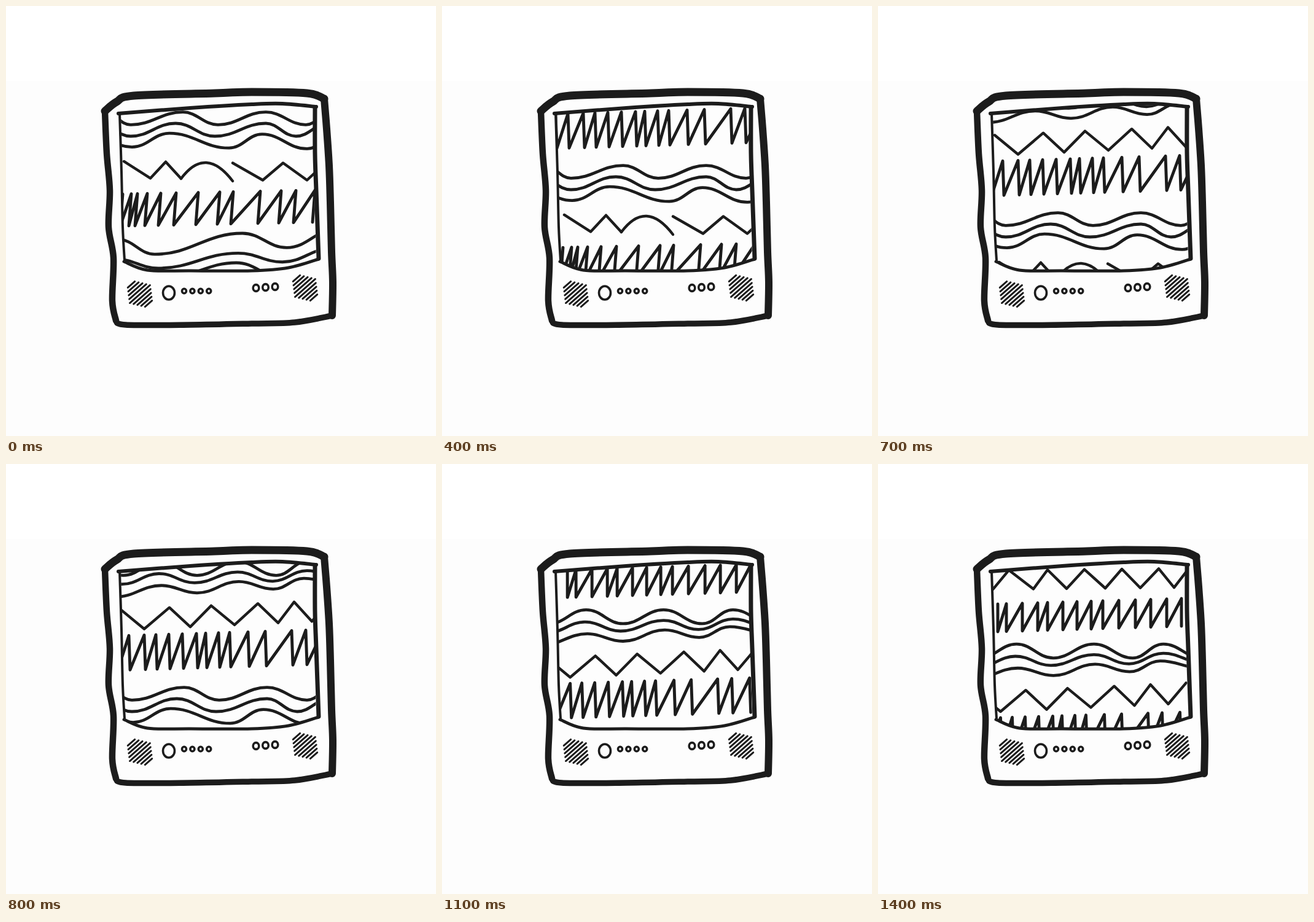
These frames come from a looping animation (700 px wide and 700 px high, 1.5 s). An HTML page:

```html
<!DOCTYPE html>
<html lang="en">
<head>
<meta charset="utf-8">
<title>Television</title>
<style>
  html, body { margin: 0; width: 100%; height: 100%; overflow: hidden; background: #fff; }
  svg { display: block; width: 100vw; height: 100vh; }
  .ink { fill: none; stroke: #1c1c1c; stroke-linecap: round; stroke-linejoin: round; }
</style>
</head>
<body>
<svg viewBox="0 0 700 700">
  <defs>
    <clipPath id="screen">
      <path d="M187 176L300 166L400 160L501 164L502 300L505 412L460 427L400 431L230 430L193 416L189 300Z"/>
    </clipPath>
  </defs>
  <rect width="700" height="700" fill="#fff"/>
  <rect y="122" width="700" height="578" fill="#fdfdfd"/>
  <g clip-path="url(#screen)"><g id="strip" class="ink"></g></g>
  <g id="tv" class="ink"></g>
</svg>
<script>
const NS = 'http://www.w3.org/2000/svg';
const MID = 345;
const strip = document.getElementById('strip');
const tv = document.getElementById('tv');

function add(parent, tag, attrs) {
  const el = document.createElementNS(NS, tag);
  for (const k in attrs) el.setAttribute(k, attrs[k]);
  parent.appendChild(el);
  return el;
}

function line(parent, d, width) {
  add(parent, 'path', { d, 'stroke-width': width });
}

// Catmull-Rom spline through a few points
function smooth(s) {
  const p = s.split(' ').map(q => q.split(',').map(Number));
  const at = i => p[Math.max(0, Math.min(p.length - 1, i))];
  let d = 'M' + p[0];
  for (let i = 0; i < p.length - 1; i++) {
    const [a, b, c, e] = [at(i - 1), at(i), at(i + 1), at(i + 2)];
    const h1 = b.map((v, k) => v + (c[k] - a[k]) / 6);
    const h2 = c.map((v, k) => v - (e[k] - b[k]) / 6);
    d += `C${h1} ${h2} ${c}`;
  }
  return d;
}

// Turning points alternate crest, trough, crest... around a tilted middle line
function turns(xs, mid, amp, tilt) {
  return xs.map((x, i) => [x, mid + tilt * (x - MID) + (i % 2 ? amp : -amp)]);
}

function wave(parent, xs, mid, amp, tilt = 0) {
  const d = turns(xs, mid, amp, tilt).map(([x, y], i, p) => {
    if (!i) return `M${x} ${y}`;
    const [px, py] = p[i - 1], reach = (x - px) * 0.42;
    return `C${px + reach} ${py} ${x - reach} ${y} ${x} ${y}`;
  });
  line(parent, d.join(''), 4.8);
}

function ridge(parent, xs, mid, amp, tilt = 0, width = 4.4) {
  line(parent, 'M' + turns(xs, mid, amp, tilt).join('L'), width);
}

// Scribble: each crest is followed by a trough almost straight below
function scribble(parent, crests, lean, mid, amp, tilt) {
  ridge(parent, crests.flatMap(x => [x, x + lean]), mid, amp, tilt, 4.9);
}

// Rows of the scrolling drawing; each is given where it stands at scroll (x, y)
function row(x, y) {
  return add(strip, 'g', { transform: `translate(${-x} ${-y})` });
}

const first = row(0, 0);
wave(first, [160, 203, 288, 345, 423, 488, 530], 183, 10.3);
wave(first, [150, 203, 276, 340, 423, 472, 525], 201.5, 10.5);
wave(first, [130, 205, 266, 363, 417, 490, 540], 219.5, 11.5, 0.01);
ridge(first, [192, 235, 260, 285], 268, 13.5, 0.01);
line(first, 'M285 281Q325 227 369 285', 4.4);
ridge(first, [340, 369, 418, 451, 490, 520].slice(1).reverse(), 269.5, 14);
scribble(first, [190, 204, 214, 230, 252, 277, 313, 348, 370, 414, 448, 472, 503], -4, 329, 26, -0.02);
wave(first, [183, 242, 385, 457, 540], 385.5, 13.5, -0.05);
wave(first, [180, 248, 378, 450, 530], 413, 9, -0.05);
wave(first, [150, 260, 375, 450, 530], 430, 12);

const second = row(5, 164);
scribble(second, [183, 203, 228, 247, 268, 290, 313, 328, 349, 367, 397, 425, 468, 491, 520], 2, 276, 28, -0.03);

const third = row(-1, 218);
ridge(third, [184, 222, 263, 297, 331, 369, 407, 440, 466, 495, 524], 273.5, 16.5, -0.045);
wave(third, [120, 188, 248, 308, 374, 437, 487, 550], 197, 11.3);
wave(third, [115, 186, 246, 304, 374, 431, 487, 550], 211.5, 8, -0.02);
wave(third, [110, 175, 250, 308, 376, 432, 482, 550], 227.5, 7.5, -0.05);

const fourth = row(-23.5, 325.5);
scribble(fourth, [195, 209, 235, 260, 276, 301, 324, 347, 366, 392, 419, 444, 470, 494], 0, 246, 22.5, -0.03);
ridge(fourth, [213, 182].concat([]).reverse().slice(1), 187, 16);
ridge(fourth, [150, 187, 213, 253, 276, 307, 336, 370, 397, 427, 457, 482, 506], 187, 15.5, -0.01);

// Cabinet sides
line(tv, smooth('161,171 180,156 208,146 340,142 400,140 490,142 518,151'), 13);
line(tv, smooth('518,151 522,200 526,260 528,320 530,400 532,450 531,504'), 12);
line(tv, smooth('531,504 470,515 400,517 300,519 195,519 179,512'), 9.5);
line(tv, smooth('179,512 173,480 175,410 167,360 169,300 164,240 161,171'), 10.5);

// Screen frame
line(tv, smooth('183,175 300,166 400,160 450,159 505,164'), 6);
line(tv, smooth('503,165 503,240 505,300 509,411'), 7);
line(tv, smooth('185,175 188,270 190,360 193,414'), 4);
line(tv, smooth('192,416 230,430 300,431 400,431 460,426 509,412'), 5);

// Speaker: parallel strokes, longest in the middle
function speaker(cx, cy) {
  for (let i = -4; i <= 4; i++) {
    const x = cx + i * 3.5, y = cy + i * 3.9, half = 22 - 3.6 * Math.abs(i);
    line(tv, `M${x - 0.75 * half} ${y + 0.66 * half}L${x + 0.75 * half} ${y - 0.66 * half}`, 3);
  }
}
speaker(218, 469);
speaker(487, 459);

// Knobs
function knob(cx, cy, rx, ry) {
  add(tv, 'ellipse', { cx, cy, rx, ry, 'stroke-width': 3.6 });
}
knob(265, 467, 9.5, 11);
for (let i = 0; i < 4; i++) knob(290 + i * 13.4, 464, 3.5, 3.7);
for (let i = 0; i < 3; i++) knob(407 + i * 15.5, 459 - i, 4.8, 5.4);

// Scroll keys: step, x, y
const STEP = 100, STEPS = 15;
const keys = [[0, 0, 0], [2, 7, 52], [4, 7, 87], [7, 5, 164], [9, -1, 218], [12, -21, 295.5], [14, -23.5, 325.5]];

function scroll(step) {
  let i = 0;
  while (i < keys.length - 2 && keys[i + 1][0] <= step) i++;
  const [a, b] = [keys[i], keys[i + 1]];
  const k = (step - a[0]) / (b[0] - a[0]);
  return [1, 2].map(j => a[j] + (b[j] - a[j]) * k);
}

function draw(ms) {
  const [x, y] = scroll(Math.floor(ms / STEP) % STEPS);
  strip.setAttribute('transform', `translate(${x} ${y})`);
}

const start = performance.now();
function tick() {
  draw(performance.now() - start);
  requestAnimationFrame(tick);
}
tick();
</script>
</body>
</html>
```
